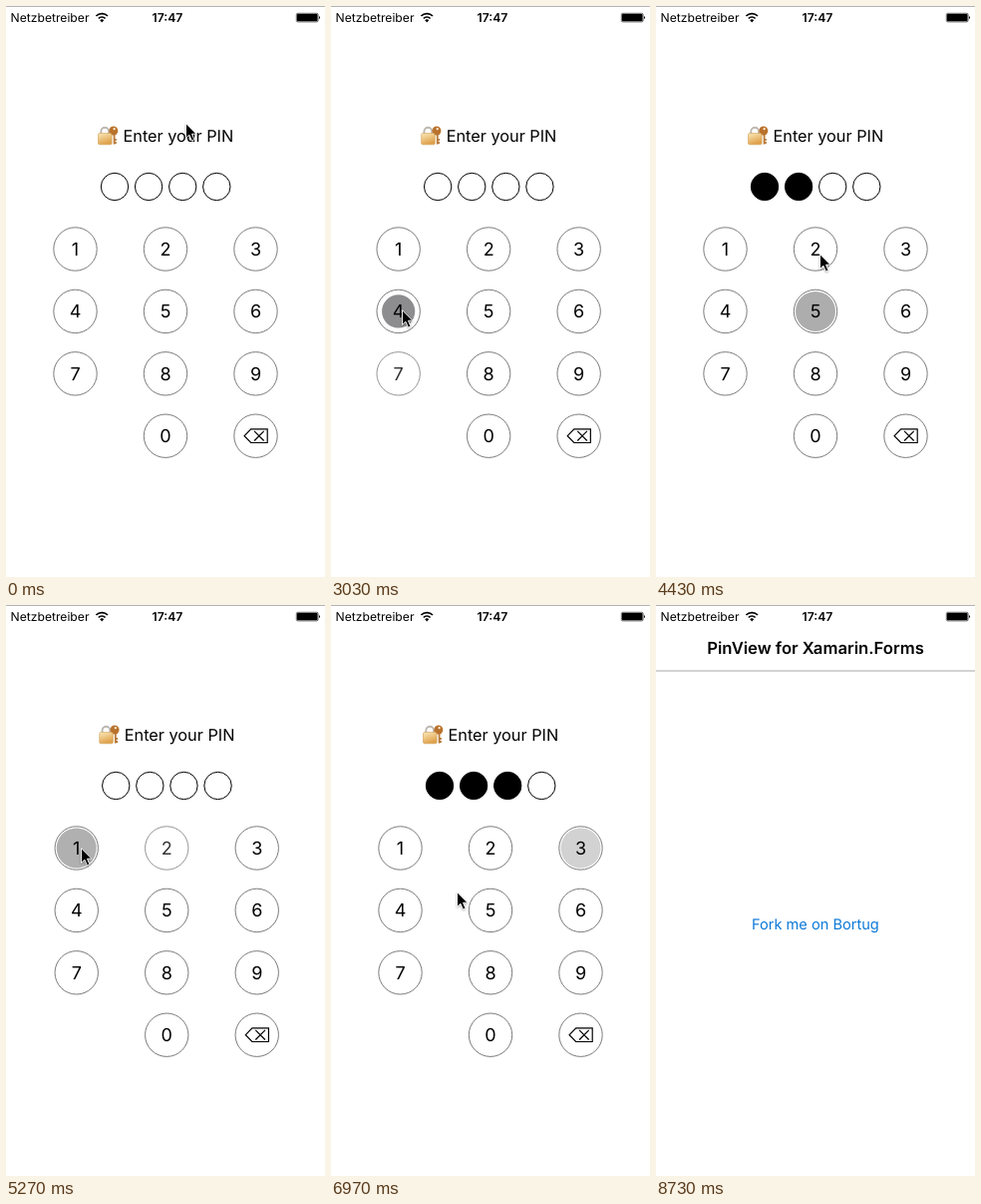
Write an HTML page that moves like this. It is 320 by 572 pixels and loops after 8.76 s.

```html
<!DOCTYPE html>
<html lang="en">
<head>
<meta charset="utf-8">
<title>PIN entry</title>
<style>
html, body { margin: 0; width: 100%; height: 100%; overflow: hidden; background: #fff; }
svg { display: block; width: 100vw; height: 100vh; }
text { font-family: Inter, Roboto, sans-serif; fill: #000; text-rendering: geometricPrecision; }
.key text { font-size: 18px; text-anchor: middle; }
.key .rim { fill: none; stroke: #6c6c6c; stroke-width: .9; }
.dot { stroke: #000; stroke-width: 1; }
.line { fill: none; stroke: #000; stroke-width: 1.2; }
</style>
</head>
<body>
<svg viewBox="0 0 320 572">
  <defs>
    <linearGradient id="gold" x2="0.4" y2="1">
      <stop offset="0" stop-color="#faeaba"/>
      <stop offset="1" stop-color="#dfa04a"/>
    </linearGradient>
  </defs>

  <g id="page">
    <rect width="320" height="572" fill="#fff"/>
    <text x="160" y="49.3" font-size="16.65" font-weight="600" text-anchor="middle">PinView for Xamarin.Forms</text>
    <rect y="65.5" width="320" height="1" fill="#a6a6a8"/>
    <text x="95.9" y="325" font-size="14.6" style="fill:#0c79d8">Fork me on Bortug</text>
  </g>

  <g id="sheet">
    <rect width="320" height="572" fill="#fff"/>
    <g id="pad">
      <g id="lock">
        <path d="M95.3 129v-3.4a3.9 3.9 0 0 1 7.8 0v3.4" fill="none" stroke="#bcb8b0" stroke-width="1.9"/>
        <path d="M108.6 127v11.4M108.6 134h2.2M108.6 137h2.2" fill="none" stroke="#b87a3a" stroke-width="1.8"/>
        <circle cx="107.8" cy="125" r="4.5" fill="#b9722c"/>
        <circle cx="108.6" cy="123.2" r="1.1" fill="#fff0d8"/>
        <rect x="92.5" y="127.4" width="13.6" height="11.4" rx="1.6" fill="url(#gold)" stroke="#cf9c50" stroke-width=".6"/>
      </g>
      <text x="117.5" y="136" font-size="16.3">Enter your PIN</text>
    </g>
  </g>

  <g id="status">
    <rect width="320" height="1" fill="#b4b4b6"/>
    <text x="4.6" y="16" font-size="12.15">Netzbetreiber</text>
    <g fill="none" stroke="#000" stroke-width="1.7">
      <path d="M90.4 10a8.3 8.3 0 0 1 11.6 0"/>
      <path d="M92.8 12.5a4.9 4.9 0 0 1 6.8 0"/>
    </g>
    <path d="M96.2 16.4l-2-2.2a2.8 2.8 0 0 1 4 0z"/>
    <text x="162" y="16" font-size="12.2" font-weight="600" text-anchor="middle">17:47</text>
    <rect x="291.3" y="7.3" width="21.8" height="8.6" rx="1.4" fill="none" stroke="#000" stroke-width=".6"/>
    <rect x="291.9" y="7.9" width="20.6" height="7.4" rx=".8"/>
    <path d="M314 9.9a2 2 0 0 1 0 3.4z"/>
  </g>

  <path id="cursor" d="M.5 .7v14.6l3.4-3.1l2.5 5.7l2.5-1.1l-2.4-5.6h4.4z" stroke="#fff" stroke-width=".9" stroke-linejoin="round"
        style="filter:drop-shadow(0 1px 1px rgba(0,0,0,.3))"/>
</svg>

<script>
const LOOP = 8760, FADE = 560, GROW = 230, SHAKE = 280;
const SLIDE = [7115, 7545];

// key, press time
const presses = [
  ['1', 1525], ['4', 1850], ['7', 2400], ['4', 2935],
  ['4', 3780], ['5', 4210], ['2', 4600], ['1', 5040],
  ['1', 5825], ['2', 6230], ['3', 6640], ['4', 7100]
];
const shakes = [2950, 5055];

// time, x, y of the pointer tip
const path = [
  [0, 180, 117], [800, 180, 117], [1270, 74, 241], [1600, 74, 241],
  [1830, 78, 310], [1950, 78, 310], [2300, 74, 370], [2480, 74, 370],
  [2850, 71, 304], [3850, 71, 304], [4130, 164, 307], [4260, 164, 307],
  [4430, 164, 248], [4680, 164, 246], [4960, 75, 243], [5870, 75, 243],
  [6130, 144, 241], [6200, 156, 241], [6300, 156, 241], [6590, 251, 242],
  [6810, 251, 243], [7060, 75, 305], [7200, 75, 305], [7540, 101, 304],
  [7770, 101, 304], [8330, 332, 12], [LOOP, 332, 12]
];

const $ = id => document.getElementById(id);
const clamp = v => Math.max(0, Math.min(1, v));
const smooth = v => v * v * (3 - 2 * v);

function add(parent, tag, attrs, text) {
  const el = document.createElementNS('http://www.w3.org/2000/svg', tag);
  for (const k in attrs) el.setAttribute(k, attrs[k]);
  if (text) el.textContent = text;
  return parent.appendChild(el);
}

const pad = $('pad');
const dots = [0, 1, 2, 3].map(i =>
  add(pad, 'circle', { class: 'dot', cx: 109 + 34.1 * i, cy: 181, r: 13.7 }));

const keys = {};
[...'123456789 0<'].forEach((name, i) => {
  if (name === ' ') return;
  const x = 69.5 + 90.5 * (i % 3), y = 243.5 + 62.4 * Math.floor(i / 3);
  const g = add(pad, 'g', { class: 'key', transform: `translate(${x} ${y})` });
  const ripple = add(g, 'circle', { r: 0, fill: '#09080c' });
  add(g, 'circle', { class: 'rim', r: 21.7 });
  if (name === '<') add(g, 'path', { class: 'line', d: 'M-11.4 0L-4.8 -6.8H11.7V6.8H-4.8ZM-1.4 -4.8L8.2 4.8M8.2 -4.8L-1.4 4.8' });
  else add(g, 'text', { y: 6.5 }, name);
  keys[name] = { g, ripple };
});

function pointer(t) {
  const i = path.findIndex(p => p[0] > t);
  const [t0, x0, y0] = path[i - 1], [t1, x1, y1] = path[i];
  const k = smooth((t - t0) / (t1 - t0));
  return [x0 + (x1 - x0) * k, y0 + (y1 - y0) * k];
}

function shakeAt(t) {
  const start = shakes.find(s => t >= s && t < s + SHAKE);
  if (start === undefined) return 0;
  const age = t - start;
  return -6.5 * Math.sin(age / 76 * 2 * Math.PI) * (1 - age / SHAKE);
}

function draw(t) {
  const done = presses.filter(p => p[1] <= t);
  const filled = done.length === presses.length ? 4 : done.length % 4;
  dots.forEach((d, i) => d.setAttribute('fill', i < filled ? '#000' : '#fff'));

  const dx = shakeAt(t);
  const dim = dx ? done[done.length - 2][0] : '';
  for (const name in keys) {
    const { g, ripple } = keys[name];
    const last = done.filter(p => p[0] === name).pop();
    const age = last ? t - last[1] : FADE;
    const grow = 1 - (1 - clamp(age / GROW)) ** 2;
    ripple.setAttribute('r', 10 + 10 * grow);
    ripple.setAttribute('opacity', .25 * (1 + Math.cos(Math.PI * clamp(age / FADE))));
    g.setAttribute('opacity', name === dim ? .8 : 1);
  }
  pad.setAttribute('transform', `translate(${dx} 0)`);

  const k = clamp((t - SLIDE[0]) / (SLIDE[1] - SLIDE[0]));
  $('sheet').setAttribute('transform', `translate(0 ${572 * (1 - (1 - k) ** 3)})`);
  $('cursor').setAttribute('transform', `translate(${pointer(t)})`);
}

const begin = performance.now();
function tick() {
  draw((performance.now() - begin) % LOOP);
  requestAnimationFrame(tick);
}
tick();
</script>
</body>
</html>
```
